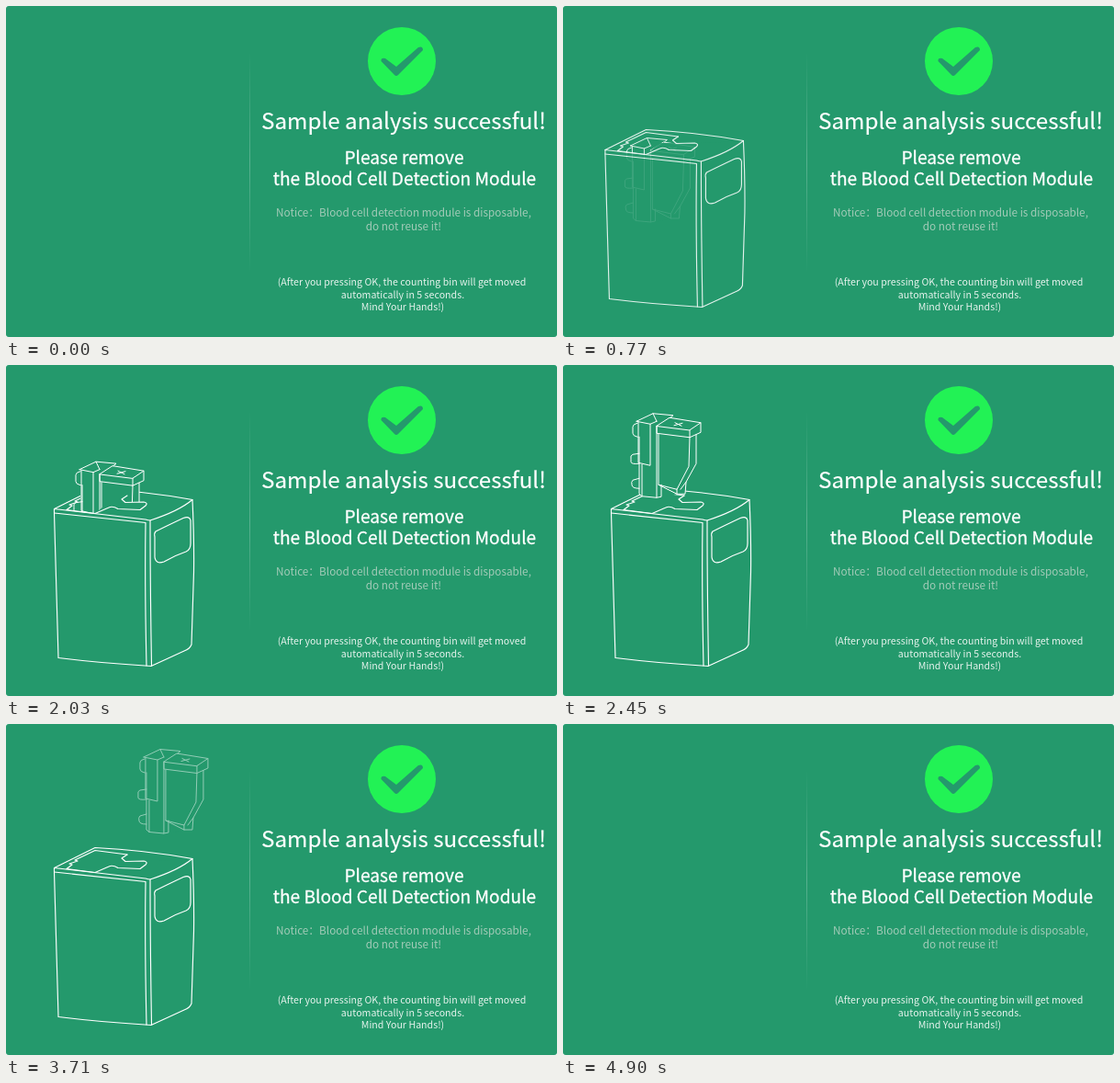
Write an HTML page that moves like this. It is 600x360 px and loops after 5250 ms.

```html
<!DOCTYPE html>
<html lang="en">
<head>
<meta charset="utf-8">
<title>Sample analysis</title>
<style>
  html, body { margin: 0; width: 100%; height: 100%; overflow: hidden; background: #fff; }
  svg { display: block; width: 600px; height: 360px; }
  text { font-family: "Noto Sans CJK SC", "Noto Sans CJK JP", "Noto Sans CJK", "Noto Sans", sans-serif; text-anchor: middle; fill: #fff; }
  .title { font-size: 24.2px; stroke: #fff; stroke-width: .2px; }
  .sub { font-size: 19.15px; stroke: #fff; stroke-width: .3px; }
  .notice { font-size: 11.75px; fill: #a3cbb8; }
  .small { font-size: 10.65px; fill: #e6f3ed; }
  .line { fill: none; stroke: #fff; stroke-width: 1.15; stroke-linejoin: round; stroke-linecap: round; }
  .solid { fill: #24996c; }
  #module .line { stroke-width: 1; }
</style>
</head>
<body>
<svg viewBox="0 0 600 360">
  <defs>
    <linearGradient id="fade" x1="0" y1="0" x2="0" y2="1">
      <stop offset="0" stop-color="#fff" stop-opacity="0"/>
      <stop offset=".5" stop-color="#fff" stop-opacity=".24"/>
      <stop offset="1" stop-color="#fff" stop-opacity="0"/>
    </linearGradient>
  </defs>
  <rect class="solid" width="600" height="360" rx="3"/>
  <rect x="265" y="50" width="1" height="240" fill="url(#fade)"/>

  <circle cx="431" cy="60" r="37" fill="#22f255"/>
  <path class="solid" d="M408.5 60Q408 56 413 57L425 66L449 45Q454 43 454 48L427 75Q425 77 423 75Z"/>

  <text class="title" x="433" y="134">Sample analysis successful!</text>
  <text class="sub" x="433.5" y="172">Please remove</text>
  <text class="sub" x="434" y="195">the Blood Cell Detection Module</text>
  <text class="notice" x="433" y="229">Notice：Blood cell detection module is disposable,</text>
  <text class="notice" x="433" y="243.5">do not reuse it!</text>
  <text class="small" x="431" y="304">(After you pressing OK, the counting bin will get moved</text>
  <text class="small" x="432" y="317.5">automatically in 5 seconds.</text>
  <text class="small" x="432" y="330.5">Mind Your Hands!)</text>

  <!-- far edges of the bin and slot -->
  <g id="back">
    <path class="line" d="M52.5 156.5L97 134.5Q150 137 203 146.5M66 157.5L72 153L69 152L78 149L75 148L97 137.5L132 142"/>
  </g>

  <g id="module">
    <path class="solid" d="M80 36L98 27.5L120 29.5L150 38V48L145 50V82L134 102L133 115L124 115L107 119L86 118L83 115Z"/>
    <g class="line">
      <path d="M83 53V115L86 117.5L102 119V42M102 119L107 118V105M86 117.5V83"/>
      <path d="M80 36L98 27.5L120 29.5L117 32M80 36L95 39L102 36M95 39V84L82 81V53M82 37V53M98 27.5L102 36"/>
      <path d="M81 38Q76 39 76 42V49Q76 52 81 53M83 71L76 72Q73 73 74 77V80Q74 83 83 82M83 98L76 100Q74 102 75 105Q75 109 83 109"/>
      <path d="M102 41L116 32L150 37.5L138 45.5ZM102 41V49L138 53.5V45.5M138 53.5L150 48V37.5"/>
      <path d="M122 37.5L129 41M121 40.5L130 38"/>
      <path d="M104 50V105L124 115L133 115L134 102L145 82V50.5M138 53.5L137 85L124 110L104 105M124 110V115M134 102L128 110"/>
    </g>
  </g>

  <!-- near faces, hiding whatever is inside the bin -->
  <g id="front">
    <path class="solid" d="M53 157L66 158L97 161.5L112 149L154 149L203 147L204 200L200 308L157 327L57 318Z"/>
    <g class="line">
      <path d="M132 142L126 146L130 149.5L150 149Q155 150 152 153L146 157.5L122 156.5Q116 153 112 155L97 161.5L66 157.5"/>
      <path d="M52.5 156.5L152 168Q155 169 157 169Q188 159 203 146.5Q205 190 204.5 225L202 304Q200 309 194 311L158 327.5L151 327Q102 324 57 318.5L52.5 161Z"/>
      <path d="M52.5 161L152 171.5Q151 240 153 327M157 169Q157 240 158.5 327"/>
      <path d="M163 181Q175 175 193 166.5Q200 164 201 169V194Q201 201 196 203Q184 207 172 214Q163 217 162 209V187Q161 183 163 181Z"/>
    </g>
  </g>
</svg>
<script>
  const LOOP = 5250, STEP = 70;
  const el = id => document.getElementById(id);
  const [back, mod, front] = ['back', 'module', 'front'].map(el);
  const start = performance.now();

  // Share of the way still to go between two times
  const left = (t, from, to) => 1 - Math.min(1, Math.max(0, (t - from) / (to - from)));

  function place(node, x, y, opacity) {
    node.setAttribute('transform', `translate(${x.toFixed(2)} ${y.toFixed(2)})`);
    node.setAttribute('opacity', opacity.toFixed(3));
  }

  function draw() {
    const now = (performance.now() - start) % LOOP;
    const t = Math.floor(now / STEP) * STEP;
    const enter = left(t, 70, 1330) ** 2.5;
    const x = -50 * enter;
    const shown = (1 - enter) * left(t, 4620, 4900);
    const lift = 116 * left(t, 1820, 3080) ** 2.2;
    const aside = 101 * (1 - left(t, 3290, 4130) ** 1.7);

    place(back, x, 0, shown);
    place(front, x, 0, shown);
    place(mod, x + aside, lift, (1 - enter) * left(t, 3290, 4130));
    requestAnimationFrame(draw);
  }
  draw();
</script>
</body>
</html>
```
